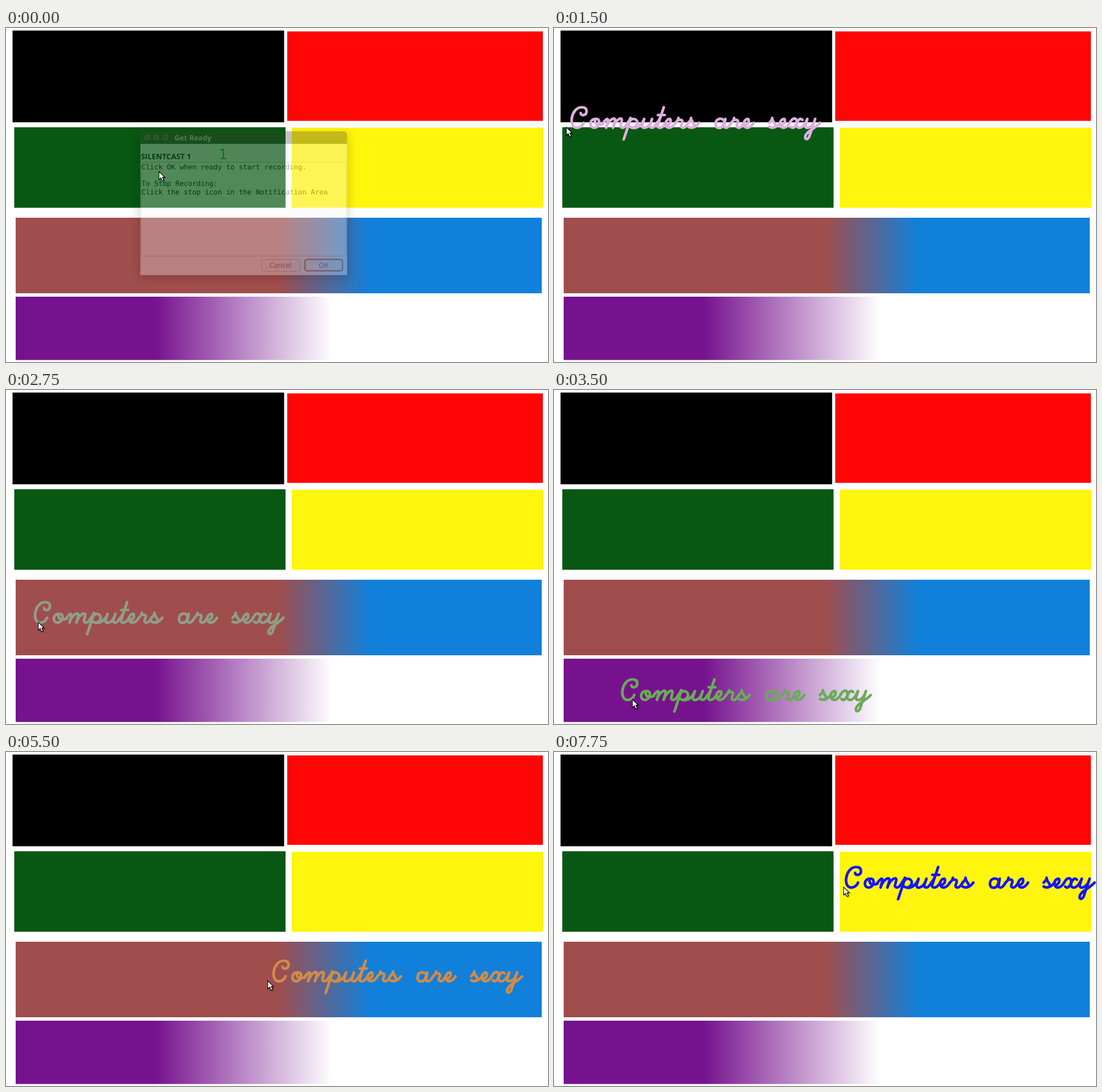
These frames come from a looping animation (952x588 px, 8000 ms). An HTML page:

```html
<!DOCTYPE html>
<html lang="en">
<head>
<meta charset="utf-8">
<title>Text gliding over colour panels</title>
<style>
html, body { margin: 0; width: 100%; height: 100%; overflow: hidden; background: #fff; }
svg { display: block; width: 952px; height: 588px; }
text { text-rendering: geometricPrecision; }
.sans { font-family: "Open Sans", sans-serif; }
.mono { font: 12.35px "DejaVu Sans Mono", monospace; }
</style>
</head>
<body>
<svg viewBox="0 0 952 588">
  <defs>
    <linearGradient id="warmCool" gradientUnits="userSpaceOnUse" x1="478" x2="640" y1="0" y2="0">
      <stop offset="0" stop-color="#a04d4d"/><stop offset="1" stop-color="#1180da"/>
    </linearGradient>
    <linearGradient id="fade" gradientUnits="userSpaceOnUse" x1="262" x2="574" y1="0" y2="0">
      <stop offset="0" stop-color="#76128e"/><stop offset="1" stop-color="#fff"/>
    </linearGradient>
    <filter id="blur" x="-20%" y="-20%" width="140%" height="140%"><feGaussianBlur stdDeviation="9"/></filter>
    <filter id="soft" x="-50%" y="-50%" width="200%" height="200%"><feGaussianBlur stdDeviation="1"/></filter>
  </defs>

  <rect width="952" height="588" fill="#fff"/>
  <rect x="11.5" y="4.5" width="477" height="161.5"/>
  <rect x="494" y="6" width="449" height="157.5" fill="#ff0505"/>
  <rect x="14.5" y="174.7" width="476.5" height="141.8" fill="#085813"/>
  <rect x="502" y="175.6" width="442" height="140.9" fill="#fff50d"/>
  <rect x="17" y="334" width="924" height="133" fill="url(#warmCool)"/>
  <rect x="17" y="473" width="924" height="111.5" fill="url(#fade)"/>

  <g id="dialog">
    <g opacity=".31">
      <rect x="234" y="186" width="367" height="254" fill-opacity=".55" filter="url(#blur)"/>
      <path d="M236 435V188q0-6 6-6H593q6 0 6 6V435z" fill="#f2f1f0"/>
      <path d="M236 204V188q0-6 6-6H593q6 0 6 6V204z" fill="#3c3b37"/>
      <g fill="#6b6962" stroke="#252420">
        <circle cx="248" cy="193" r="6"/><circle cx="264" cy="193" r="6"/><circle cx="280" cy="193" r="6"/>
      </g>
      <path d="M246 191l4 4m0-4l-4 4M261.500 193h5M278 191h4v4h-4z" fill="none" stroke="#252420"/>
      <text class="sans" x="296" y="197.500" font-size="12.8" font-weight="700" fill="#dfdbd2">Get Ready</text>
      <text class="sans" x="237" y="231" font-size="13.2" font-weight="700">SILENTCAST 1</text>
      <rect x="237.500" y="236.500" width="360" height="165" fill="#f6f5f4" stroke="#b8b4ae"/>
      <g class="mono">
        <text x="238" y="249">Click OK when ready to start recording.</text>
        <text x="238" y="278">To Stop Recording:</text>
        <text x="238" y="293">Click the stop icon in the Notification Area</text>
      </g>
      <rect x="448.500" y="407.500" width="68" height="21" rx="4" fill="#f0efed" stroke="#a8a39c"/>
      <rect x="525" y="407.500" width="66" height="20" rx="4" fill="#f0efed" stroke="#b5512c" stroke-width="2.500"/>
      <g class="sans" font-size="12.5" text-anchor="middle" fill="#3c3c3c">
        <text x="482" y="422">Cancel</text><text x="558" y="422">OK</text>
      </g>
    </g>
    <text x="381.500" y="231" font-size="25" text-anchor="middle" fill="#087522" font-family="DejaVu Sans, sans-serif">1</text>
  </g>

  <g id="script" role="img" aria-label="Computers are sexy" fill="none" stroke-linecap="round" stroke-linejoin="round"/>
  <g id="cursor">
    <path d="M2 2.500V17l3.500-3 2.500 5.500 3-1.300-2.500-5.400H13z" opacity=".4" filter="url(#soft)"/>
    <path d="M.7 .9V14.700l3.300-2.900 2.600 5.700 2.600-1.200-2.500-5.400h4.200z" fill="#fff" stroke="#000" stroke-width="1.100"/>
  </g>
</svg>
<script>
const STEP = 250, LOOP = 8000, UNIT = 1.716, STROKE = 4.7;
const $ = id => document.getElementById(id);

// Joined handwriting: each letter starts at height 0, with its advance.
const hook = "q-1 3 2 3q2 0 5-5";
const hump = "c3-9 10-12 9-7";
const cup = "M0 0L2-4L0 2C-1 7 6 6 9-1";
const letters = {
  C: [19, "M10-10C10-7 16-7 16-12Q16-16 11-16C0-16-3 5 6 5Q11 5 13 0"],
  o: [14, "M6-4C0-4-1 5 5 5C10 5 12-4 7-4C4-4 6 2 9 2Q12 2 14 1"],
  m: [25, "M0 0Q3-4 4-4C6-4 4 1 3 5" + hump + "l-2 7" + hump + "l-1 4" + hook],
  p: [15, "M0 0L2-3L3-5L2-1L-4 17M2-1C4-6 10-4 10 0Q10 3 6 5M2 4Q9 8 15 0"],
  u: [15, cup + "M10-4L8 2" + hook],
  t: [9, "M0 0Q2-2 4-7M7-16L1 2Q0 5 3 5Q6 5 9 0M1-8H8"],
  e: [10, "M1 3Q5 1 5-2Q5-4 4-4C2-4 0-2 0 1C0 6 6 7 10 0"],
  r: [13, "M0 0Q3-3 3-5V-3H6Q8-2 6 2" + hook],
  s: [11, "M0 0Q3-3 3-5Q3-3 5 0Q8 4 4 5M0 4Q6 7 11 0"],
  a: [17, "M10-1C9-6 1-5 1 1C1 7 8 6 9 2L11-4L10 2" + hook],
  x: [16, "M0 0C3-6 7-5 7-2V2C7 6 12 7 16 0M13-3Q11-5 9-3L5 4Q3 6 1 4"],
  y: [15, cup + "M10-4L4 14Q2 18 0 16C-2 10 10 6 15 0"],
  " ": [16, ""]
};

function write(line) {
  let x = -1;
  return [...line].map(ch => {
    const [advance, d] = letters[ch];
    const path = `<path d="${d}" transform="translate(${x} 16)"/>`;
    x += advance;
    return path;
  }).join("");
}

// Turning points of the drag: step, text x, text y, lead of the pointer.
const drag = [
  [0, 274, 215, -6], [3, 47, -2, -8], [5, 25, 90, -9], [8, 40, 229, -4],
  [10, 42, 317, 2], [14, 118, 507, 19], [15, 202, 510, 13], [20, 507, 461, -4],
  [22, 468, 365, -9], [25, 415, 300, -20], [27, 376, 238, -21], [31, 511, 200, -3]
];
const inks = [
  [3, 255, 255, 255], [8, 200, 146, 198], [14, 106, 170, 88],
  [22, 211, 139, 70], [27, 94, 78, 172], [31, 20, 20, 250]
];

// Smooth curve through the keys that never overshoots them.
function glide(keys, k) {
  const last = keys.length - 2;
  const n = Math.min(last, Math.max(0, keys.findIndex(key => key[0] >= k) - 1));
  const [a, b] = [keys[n], keys[n + 1]], span = b[0] - a[0];
  const t = Math.max(0, (k - a[0]) / span), u = 1 - t;
  const slope = (i, c) => (keys[i + 1][c] - keys[i][c]) / (keys[i + 1][0] - keys[i][0]);
  const tangent = (i, c) => {
    const p = slope(Math.max(0, i - 1), c), q = slope(Math.min(last, i), c);
    return p * q > 0 ? 2 * p * q / (p + q) : 0;
  };
  return [1, 2, 3].map(c => Math.round(
    a[c] * u * u * (1 + 2 * t) + b[c] * t * t * (1 + 2 * u) +
    span * t * u * (tangent(n, c) * u - tangent(n + 1, c) * t)));
}

function draw(ms) {
  const k = Math.floor(ms % LOOP / STEP);
  const [x, y, lead] = glide(drag, k);
  $("dialog").style.display = k ? "none" : "";
  $("script").style.display = k ? "" : "none";
  $("script").setAttribute("transform", `translate(${x + 2.5} ${y + 2.5}) scale(${UNIT})`);
  $("script").setAttribute("stroke", `rgb(${glide(inks, k)})`);
  $("cursor").setAttribute("transform", `translate(${x + lead} ${y + 37})`);
}

$("script").innerHTML = write("Computers are sexy");
$("script").setAttribute("stroke-width", STROKE / UNIT);
const start = performance.now();
function tick() {
  draw(performance.now() - start);
  requestAnimationFrame(tick);
}
tick();
</script>
</body>
</html>
```
